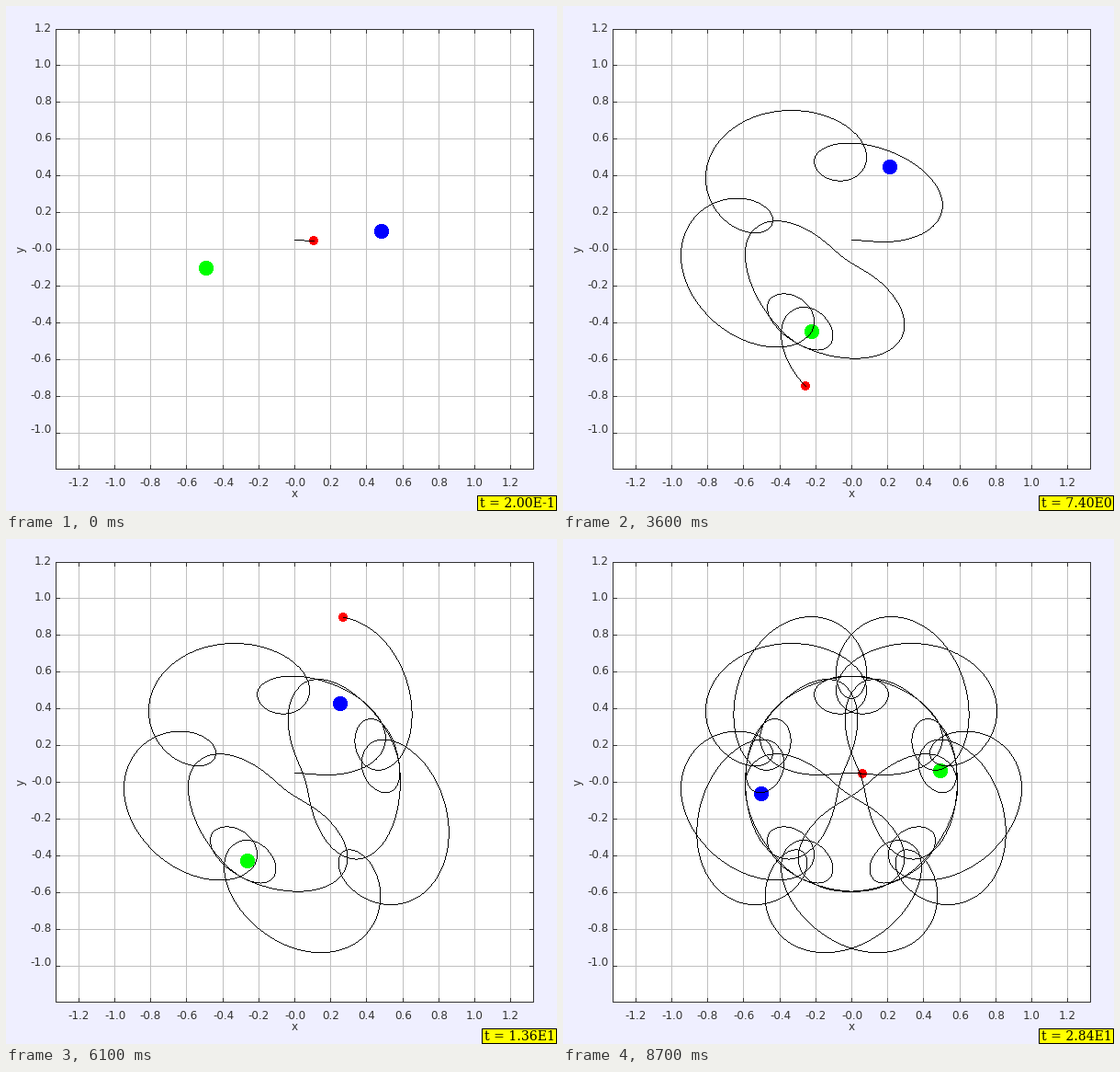
A matplotlib script that plays this animation: 600x549 px, repeating every 8800 ms.

```python
import numpy as np
import matplotlib.pyplot as plt
from matplotlib.animation import FuncAnimation
from matplotlib.patches import Rectangle

W, H, DPI = 600, 549, 100
CX, CY, SX, SY = 314.0, 265.3, 195.83, 199.17
PERIOD = 9 * np.pi          # equal masses: the picture closes after 4.5 turns
HALF = PERIOD / 2
INK, GRID = "#333333", "#c0c0c0"

# Key points of the orbit: a time, the place then, and a place passed on the way
LEGS = [
    (2.8, -0.518 + 0.097j, -0.198 + 0.486j),
    (4.8, -0.345 - 0.470j, -0.942 - 0.031j),
    (7.4, -0.253 - 0.747j, 0.299 - 0.408j),
    (10.8, 0.098 + 0.561j, 0.869 - 0.277j),
    (PERIOD - 16.4, 0.523 - 0.275j, -0.033 + 0.325j),
    (HALF, 0.463j, 0.226 + 0.908j),
]


# --- restricted three-body problem, positions as complex numbers ---

def pull(z, t):
    p = 0.5 * np.exp(1j * t)
    a, b = z - p, z + p
    ra, rb = np.abs(a), np.abs(b)
    return -0.5 * (a / (ra * ra * ra) + b / (rb * rb * rb)), np.minimum(ra, rb)


def fly(y0, v0, end, vias, log=None):
    """Fly a batch of bodies from (0, y0) with speed v0 along x until end."""
    z, v = 1j * y0, v0 + 0j
    t = np.zeros(len(z))
    near = np.full((len(vias), len(z)), 0.4)
    col = np.array(vias)[:, None]
    for _ in range(int(300 * end) + 200):
        k1, r = pull(z, t)
        h = np.minimum(np.clip(0.15 * r ** 1.5, 2e-4, 0.012), end - t)
        if np.count_nonzero(h) <= 0.03 * len(z):
            break
        hh = h * h
        k2, _r = pull(z + h / 2 * v + hh / 8 * k1, t + h / 2)
        k3, _r = pull(z + h * v + hh / 2 * k2, t + h)
        z = z + h * v + hh / 6 * (k1 + 2 * k2)
        v = v + h / 6 * (k1 + 4 * k2 + k3)
        t = t + h
        near = np.minimum(near, np.abs(z - col))
        if log is not None:
            log.append((t[0], z[0]))
    miss = near.mean(axis=0) + np.where(t < end - 1e-9, 9, 0)
    return z, v, np.nan_to_num(miss, nan=9)


def search(rng, count=150, best=12, tol=0.02):
    """Narrow the start state leg by leg with a shrinking cloud of guesses."""
    mean, cov = np.array([0.056, 0.5]), np.diag([0.003, 0.03]) ** 2
    keep = mean[None]
    vias = []
    for end, goal, via in LEGS:
        vias = vias[-1:] + [via]
        for _ in range(8):
            pool = np.vstack([rng.multivariate_normal(mean, cov, count),
                              keep[:best]])
            z, _v, miss = fly(pool[:, 0], pool[:, 1], end, vias)
            miss = miss + np.nan_to_num(np.abs(z - goal), nan=9)
            good = np.count_nonzero(miss < tol)
            keep = pool[np.argsort(miss)[:max(best, good)]]
            mean, cov = keep.mean(axis=0), np.cov(keep.T) * 1.6
            if good > count / 3:
                break
        spread = np.sqrt(np.diag(cov))
        cov = cov * 4
    return keep[:24], spread, vias


def close_orbit(starts, spread, vias, eps=1e-9):
    """Newton steps until the path meets the y axis squarely at half time."""
    y, v = starts.T.copy()
    n = len(y)
    for _ in range(7):
        z, w, _m = fly(np.concatenate([y, y + eps, y]),
                       np.concatenate([v, v, v + eps]), HALF, vias[:1])
        f, g = z.real, w.imag
        fy, fv = (f[n:2 * n] - f[:n]) / eps, (f[2 * n:] - f[:n]) / eps
        gy, gv = (g[n:2 * n] - g[:n]) / eps, (g[2 * n:] - g[:n]) / eps
        det = fy * gv - fv * gy
        dy = np.nan_to_num((f[:n] * gv - fv * g[:n]) / det, posinf=0, neginf=0)
        dv = np.nan_to_num((fy * g[:n] - f[:n] * gy) / det, posinf=0, neginf=0)
        big = np.maximum(np.abs(dy) / spread[0], np.abs(dv) / spread[1])
        k = 1 / np.maximum(1, big / 3)
        y, v = y - k * dy, v - k * dv
    y, v = np.append(y, starts[:, 0]), np.append(v, starts[:, 1])
    z, w, miss = fly(y, v, HALF, vias)
    score = (miss + np.abs(z - LEGS[-1][1]) + np.abs(z.real)
             + 0.1 * np.abs(w.imag))
    i = np.argmin(np.nan_to_num(score, nan=99))
    return y[i:i + 1], v[i:i + 1]


def make_orbit():
    with np.errstate(all="ignore"):
        starts, spread, vias = search(np.random.default_rng(5))
        y, v = close_orbit(starts, spread, vias)
        log = [(0.0, 1j * y[0])]
        fly(y, v, HALF, vias, log)
    t = np.array([a for a, _ in log])
    z = np.array([b for _, b in log])
    # the second half is the mirrored first half run backwards
    t = np.concatenate([t, (PERIOD - t[::-1])[1:]])
    z = np.concatenate([z, -np.conj(z[::-1])[1:]])
    more = (t > 0) & (t < 0.3)
    return np.append(t, t[more] + PERIOD), np.append(z, z[more])


def stage(z):
    return CX + SX * np.real(z), CY - SY * np.imag(z)


times, orbit = make_orbit()
path_x, path_y = stage(orbit)

# one trail pixel per unit step along the longer axis
steps = np.maximum(np.abs(np.diff(path_x)), np.abs(np.diff(path_y)))
reach = np.append(0, np.cumsum(steps))
marks = np.arange(int(reach[-1]) + 1)
trail_x = np.interp(marks, reach, path_x).astype(int)
trail_y = np.interp(marks, reach, path_y).astype(int)

# time runs faster towards the end
clock = 0.2 * np.cumsum([1] * 56 + [2] * 22 + [3] * 4 + [5] * 6)

# --- fixed picture ---

fig = plt.figure(figsize=(W / DPI, H / DPI), dpi=DPI, facecolor="#efefff")
ax = fig.add_axes([0, 0, 1, 1])
ax.axis("off")


def px(size):
    return size * 72 / DPI


def rule(xs, ys, color, z):
    ax.plot(xs, ys, color=color, lw=px(1), zorder=z, snap=False,
            solid_capstyle="projecting")


def label(x, y, s, **kw):
    kw = {"ha": "center", "va": "baseline", **kw}
    ax.text(x, y, s, family="DejaVu Sans", fontsize=px(12), color=INK, **kw)


def tick_name(k):
    return "-0.0" if k == 0 else f"{k * 0.2:.1f}"


L, T, R, B = 54.5, 25.5, 574.5, 503.5
ax.add_patch(Rectangle((L, T), R - L, B - T, fc="white", ec="none", zorder=0))

for k in range(-6, 7):
    x = round(314 + 39.17 * k) + 0.5
    rule([x, x], [T, B], GRID, 1)
    rule([x, x], [T, T + 4], INK, 2)
    rule([x, x], [B - 4, B], INK, 2)
    label(x, 522, tick_name(k))

for k in range(-5, 7):
    y = max(264 - 40 * k, 25) + 0.5
    rule([L, R], [y, y], GRID, 1)
    rule([L, L + 4], [y, y], INK, 2)
    rule([R - 4, R], [y, y], INK, 2)
    label(50, y + (-0.5 if k == -5 else 2.5), tick_name(k), ha="right")

rule([L, R, R, L, L], [T, T, B, B, T], INK, 3)
label(314.5, 534, "x")
label(16.5, 264.5, "y", rotation=90, va="center")

# --- moving parts ---

cols, rows = np.meshgrid(np.arange(W) + 0.5, np.arange(H) + 0.5)
layer = ax.imshow(np.zeros((H, W, 4), np.uint8), extent=[0, W, H, 0],
                  aspect="auto", interpolation="nearest", zorder=4)
box = ax.add_patch(Rectangle((518.5, 532.5), 81, 16, fc="#ffff00", ec="black",
                             lw=px(1), snap=False, zorder=6))
note = ax.text(521, 545, "", family="DejaVu Serif", fontsize=px(14),
               color="black", va="baseline", zorder=7)
ax.set_xlim(0, W)
ax.set_ylim(H, 0)


def disc(canvas, x, y, radius, color):
    inside = np.hypot(cols - int(x), rows - int(y)) < radius
    canvas[inside] = (*color, 255)


def draw(i):
    t = clock[i]
    canvas = np.zeros((H, W, 4), np.uint8)
    mass = 0.5 * np.exp(1j * t)
    disc(canvas, *stage(mass), 8, (0, 0, 255))
    disc(canvas, *stage(-mass), 8, (0, 255, 0))
    x, y = np.interp(t, times, path_x), np.interp(t, times, path_y)
    disc(canvas, x, y, 5, (255, 0, 0))
    n = int(np.interp(t, times, reach)) + 1
    canvas[trail_y[:n], trail_x[:n]] = (0, 0, 0, 255)
    layer.set_data(canvas)

    mantissa, power = f"{t:.2e}".split("e")
    note.set_text(f"t = {mantissa}E{int(power)}")
    left = 513.5 if t < 0.99 else 518.5
    box.set_x(left)
    box.set_width(599.5 - left)
    note.set_x(left + 2.5)
    return layer, box, note


anim = FuncAnimation(fig, draw, frames=len(clock), interval=100, repeat=True,
                     repeat_delay=0, blit=False)
plt.show()
```
